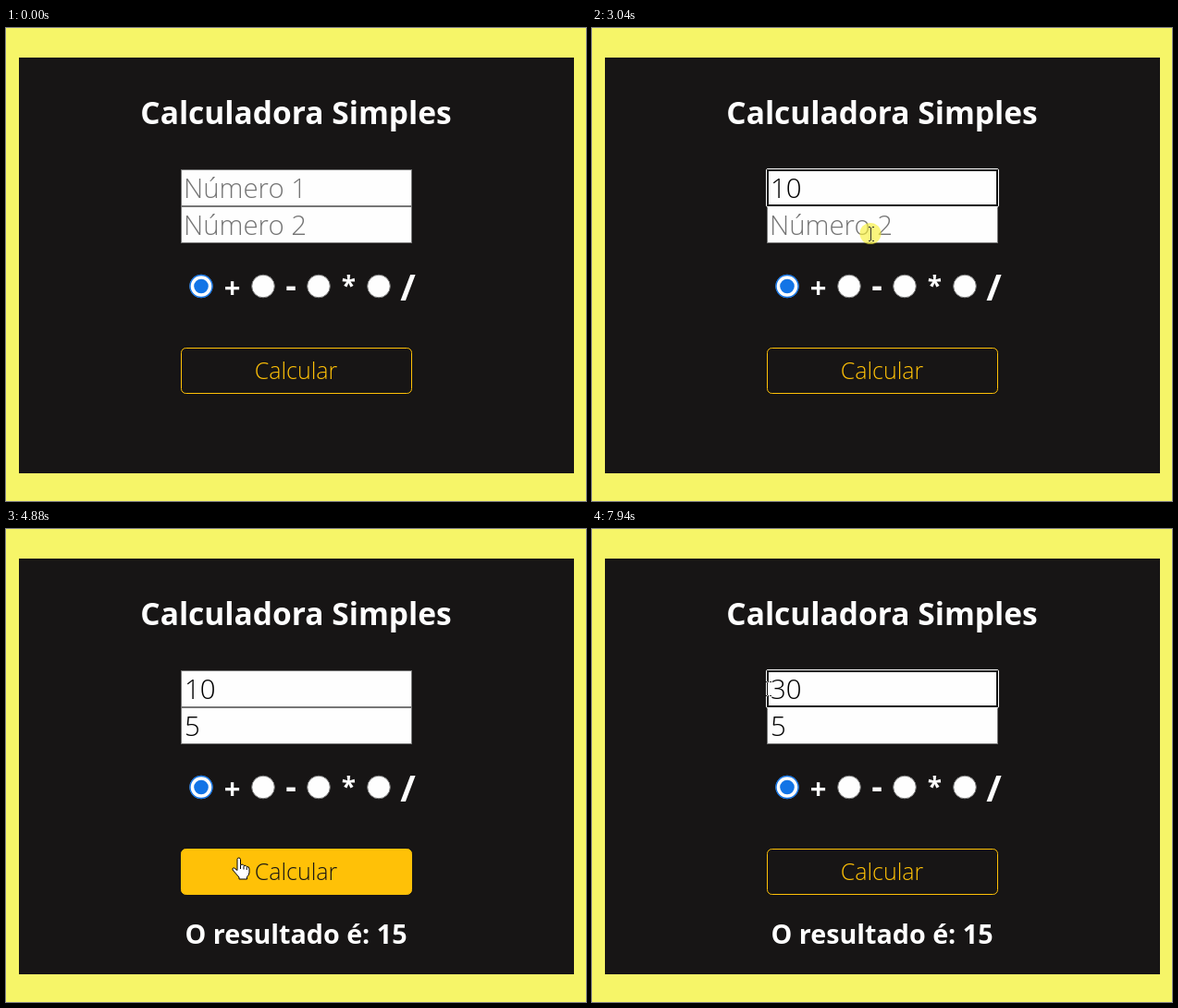
An HTML page that plays this animation: 627x512 px, repeating every 8 s.

```html
<!DOCTYPE html>
<html lang="pt">
<head>
<meta charset="utf-8">
<title>Calculadora Simples</title>
<style>
  html, body { margin: 0; width: 100%; height: 100%; overflow: hidden; background: #f6f568; }
  svg { display: block; width: 627px; height: 512px; font-family: "Open Sans", "Noto Sans", sans-serif; }
  text { white-space: pre; }
  .bold { font-weight: 700; fill: #fff; text-anchor: middle; }
  .value { font-weight: 300; font-size: 29.4px; }
  .box { fill: #fefefe; stroke: #767676; }
  .ring { fill: none; }
  .radio { fill: #fefefe; stroke: #767676; }
  #label { font-weight: 300; font-size: 25px; text-anchor: middle; }
  #beam path { fill: none; stroke-width: 1; }
</style>
</head>
<body>
<svg viewBox="0 0 627 512">
  <rect width="627" height="512" fill="#f6f568"/>
  <rect x="14" y="32" width="600" height="450" fill="#171515"/>
  <text class="bold" x="313.5" y="104" font-size="33.5">Calculadora Simples</text>

  <g id="fields"></g>
  <g id="radios"></g>

  <rect id="button" x="189.5" y="346.5" width="249" height="49" rx="5" stroke="#ffc107"/>
  <text id="label" x="313.5" y="380">Calcular</text>
  <text id="result" class="bold" x="313.5" y="449" font-size="28.7">O resultado é: 15</text>

  <circle id="click" r="11.5" fill="#f8f03a" fill-opacity=".66"/>
  <g id="beam"><path d="M-3 -7.5H-1M1 -7.5H3M-3 7.5H-1M1 7.5H3M-.5 -7V7"/></g>
  <g id="arrow">
    <path d="M0 0V17L4 13.3L6.6 19.5L9.4 18.3L6.8 12.2H12Z" fill="#fff" stroke="#000"/>
  </g>
  <g id="hand">
    <path d="M-2 1.5Q-2 0 -.3 0T1.5 1.5V7.5Q4.5 6.3 5 8.4Q7.5 7.5 8.2 9.6Q11 9 11 12V16Q10.5 19 8.5 20.5V23H0V21L-7 13Q-7.8 11 -5.5 10.8L-2 13.5Z" fill="#fff" stroke="#000" stroke-linejoin="round"/>
    <path d="M1.5 8V12M5 9V12.5M8.2 10.2V13" stroke="#000"/>
  </g>
</svg>
<script>
const LOOP = 8000;
const DIGIT = 16.8;
const $ = id => document.getElementById(id);

const start = { a: "", b: "", focus: 0, caret: 0, sel: 0, hover: 0, result: 0, click: 0, cursor: "", x: 0, y: 0 };
const at = (cursor, x, y, more) => ({ cursor, x, y, ...more });

// Each step changes part of the state and holds until the next one.
const steps = [
  [790, at("arrow", 338, 472)],
  [860, at("arrow", 335, 450)],
  [930, at("arrow", 331, 418)],
  [1000, at("hand", 328, 375, { hover: .4 })],
  [1070, at("arrow", 325, 315, { hover: .5 })],
  [1140, at("arrow", 321, 250, { hover: .1 })],
  [1210, at("beam", 318, 200, { hover: 0 })],
  [1280, at("beam", 317, 187, { click: 1 })],
  [1350, { focus: 1, caret: 1 }],
  [1420, { click: 0 }],
  [1880, { caret: 0 }],
  [2010, { a: "1", caret: 1, cursor: "" }],
  [2080, { a: "10" }],
  [2630, { caret: 0 }],
  [2700, at("beam", 316, 190)],
  [2830, at("beam", 311, 204)],
  [2900, at("beam", 305, 217)],
  [2970, at("beam", 302, 223)],
  [3040, { click: 1 }],
  [3110, { focus: 2, caret: 1 }],
  [3180, { click: 0 }],
  [3650, { caret: 0 }],
  [3790, { b: "5", caret: 1, cursor: "" }],
  [3920, at("arrow", 298, 272)],
  [3990, at("arrow", 291, 330)],
  [4060, at("hand", 288.5, 363.5, { hover: .4 })],
  [4140, at("hand", 292, 368, { hover: .9 })],
  [4200, at("hand", 293, 369.5, { hover: 1, click: 1 })],
  [4270, { focus: 0, caret: 0, result: 1 }],
  [4340, { click: 0 }],
  [4670, at("hand", 292, 378)],
  [4740, at("hand", 288, 386)],
  [4810, at("hand", 276, 380)],
  [4880, at("hand", 252, 356)],
  [4960, at("arrow", 222, 316, { hover: .5 })],
  [5040, at("arrow", 198, 270, { hover: 0 })],
  [5120, at("arrow", 182, 226)],
  [5200, at("arrow", 180, 203)],
  [5270, at("beam", 200, 186)],
  [5350, at("beam", 226, 177)],
  [5420, at("beam", 237, 174, { click: 1 })],
  [5490, { focus: 1, caret: 1 }],
  [5560, at("beam", 217, 173, { sel: 1, caret: 0 })],
  [5620, at("beam", 201, 172, { sel: 2 })],
  [5880, at("beam", 195, 172)],
  [5950, at("beam", 191, 173)],
  [6150, { click: 0 }],
  [6810, { a: "3", sel: 0, caret: 1 }],
  [7340, { caret: 0 }],
  [7410, { a: "30", caret: 1 }],
  [7940, { caret: 0 }]
];

$("fields").innerHTML = [1, 2].map(n => {
  const y = 113 + n * 40;
  return `<rect class="box" x="189.5" y="${y + .5}" width="249" height="39"/>
    <text class="value" id="hint${n}" x="192" y="${y + 31}" fill="#757575">Número ${n}</text>
    <rect id="sel${n}" y="${y + 4}" height="33" fill="#0078d7"/>
    <text class="value" x="193" y="${y + 31}"><tspan id="plain${n}"></tspan><tspan id="picked${n}" fill="#fff"></tspan></text>
    <rect id="caret${n}" y="${y + 4}" width="1" height="33"/>`;
}).join("") + [1, 2].map(n => {
  const y = 113 + n * 40;
  return `<g class="ring" id="ring${n}">
    <rect x="188.5" y="${y - .5}" width="251" height="41" rx="1.5" stroke="#fff"/>
    <rect x="190" y="${y + 1}" width="248" height="38" stroke="#101010" stroke-width="2"/></g>`;
}).join("");

// sign, radio x, sign x, baseline, font size
const signs = [
  ["+", 211, 244.5, 292, 31],
  ["-", 278, 308, 290.5, 36],
  ["*", 338, 370.5, 289, 28],
  ["/", 403, 434.5, 295, 40]
];
$("radios").innerHTML = signs.map(([sign, cx, x, y, size]) =>
  `<circle class="radio" cx="${cx}" cy="279.5" r="12.3"/>
   <text class="bold" x="${x}" y="${y}" font-size="${size}">${sign}</text>`
).join("") + `<circle cx="211" cy="279.5" r="12" fill="#fefefe" stroke="#1274e6" stroke-width="1.4"/>
  <circle cx="211" cy="279.5" r="7.8" fill="#1274e6"/>`;

const show = (id, on) => { $(id).style.display = on ? "" : "none"; };
const mix = (from, to, k) => `rgb(${from.map((v, i) => Math.round(v + (to[i] - v) * k))})`;
const DARK = [23, 21, 21], AMBER = [255, 193, 7];

function drawField(n, value, s) {
  const active = s.focus === n;
  const picked = active ? s.sel : 0;
  const cut = value.length - picked;
  show("hint" + n, !value);
  show("ring" + n, active);
  show("caret" + n, active && s.caret);
  $("caret" + n).setAttribute("x", Math.round(192.6 + value.length * DIGIT));
  $("plain" + n).textContent = value.slice(0, cut);
  $("picked" + n).textContent = value.slice(cut);
  $("sel" + n).setAttribute("x", 193 + cut * DIGIT);
  $("sel" + n).setAttribute("width", picked * DIGIT);
}

function draw(t) {
  const s = { ...start };
  for (const [time, change] of steps) if (time <= t) Object.assign(s, change);

  drawField(1, s.a, s);
  drawField(2, s.b, s);
  $("button").setAttribute("fill", mix(DARK, AMBER, s.hover));
  $("label").setAttribute("fill", mix(AMBER, DARK, s.hover));
  show("result", s.result);

  for (const kind of ["beam", "arrow", "hand"]) {
    show(kind, s.cursor === kind);
    $(kind).setAttribute("transform", `translate(${s.x} ${s.y})`);
  }
  show("click", s.click);
  $("click").setAttribute("transform", `translate(${s.x - 1} ${s.y - .5})`);
  // The text cursor inverts what lies below it.
  $("beam").style.mixBlendMode = s.click ? "normal" : "difference";
  $("beam").style.stroke = s.click ? "#333" : "#fff";
}

const t0 = performance.now();
function tick() {
  draw((performance.now() - t0) % LOOP);
  requestAnimationFrame(tick);
}
tick();
</script>
</body>
</html>
```
